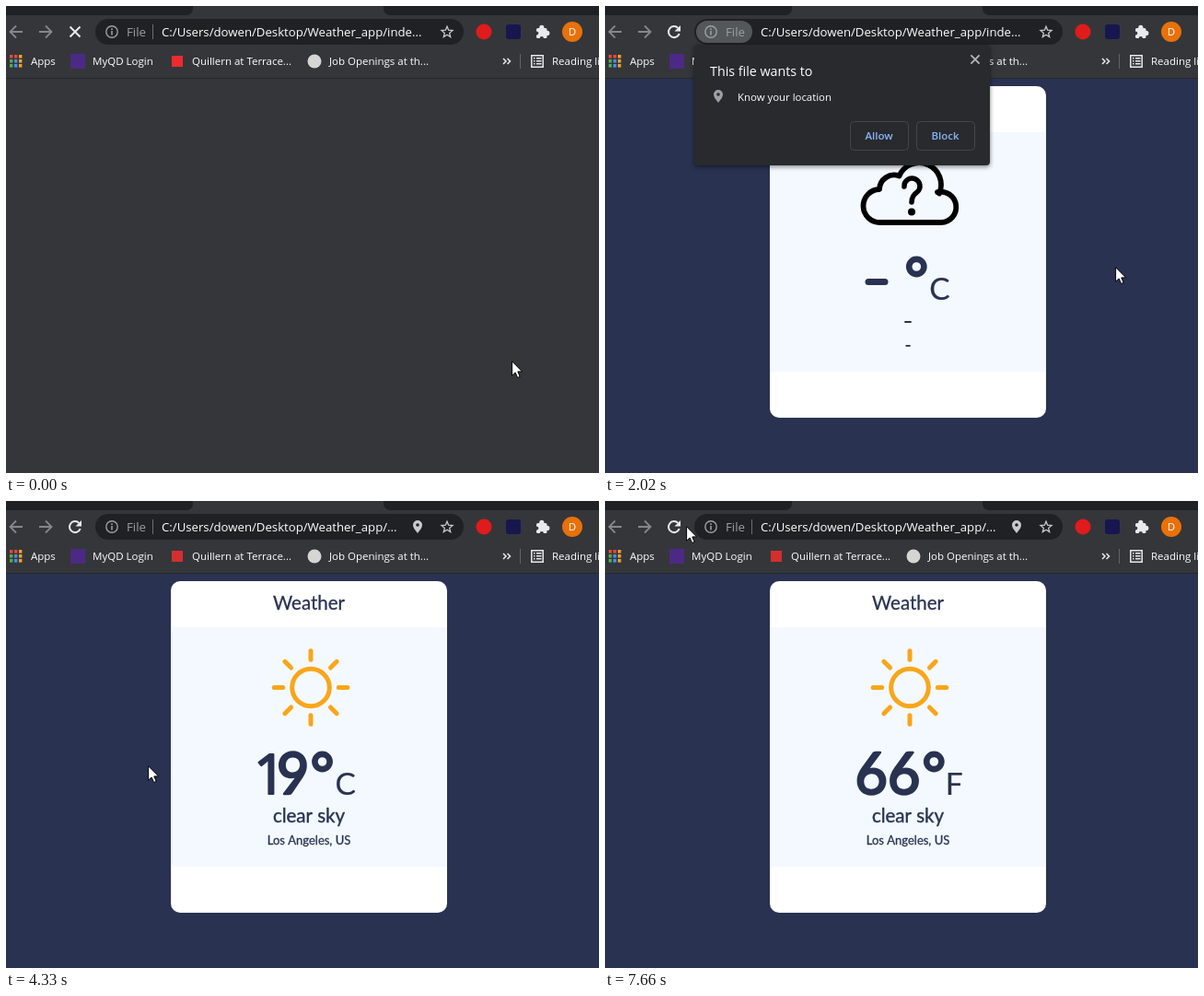
These frames come from a looping animation (644 px wide and 507 px high, 7.99 s). An HTML page with a canvas:

```html
<!DOCTYPE html>
<html lang="en">
<head>
<meta charset="utf-8">
<title>Weather app</title>
<style>
html, body { margin: 0; width: 100%; height: 100%; overflow: hidden; background: #35363a; }
canvas { display: block; }
</style>
</head>
<body>
<canvas id="stage" width="644" height="507"></canvas>
<script>
const ctx = document.getElementById('stage').getContext('2d');
const LOOP = 7990;
const UI = '"Open Sans", sans-serif';
const CARD = 'Lato, sans-serif';
const NAVY = '#293251', BAR = '#35363a', DARK = '#202124', GREY = '#9aa0a6', LIGHT = '#e8eaed', WHITE = '#fff';

// Pointer stops: [start ms, left, top, shape]
const STOPS = [
  [0, 549, 385], [340, 548, 385], [670, 551, 385], [1020, 580, 340], [1350, 587, 303],
  [2020, 554, 283], [2350, 379, 282, 'hand'], [2680, 302, 152], [3010, 298, 143],
  [3670, 181, 212], [4000, 154, 287], [4990, 225, 294, 'hand'], [5320, 328, 317, 'hand'],
  [5650, 360, 307, 'hand'], [6650, 181, 228], [6980, 94, 54], [7310, 185, 124], [7660, 88, 27]
];

function text(str, x, y, size, color, weight = 400, align = 'left') {
  ctx.font = `${weight} ${size}px ${UI}`;
  ctx.textAlign = align;
  ctx.fillStyle = color;
  ctx.fillText(str, x, y);
}

// Rounded lettering: a regular face thickened with a round outline
function soft(str, x, y, size, extra, align = 'left', family = CARD) {
  ctx.font = `400 ${size}px ${family}`;
  ctx.textAlign = align;
  ctx.fillStyle = ctx.strokeStyle = NAVY;
  ctx.fillText(str, x, y);
  ctx.lineWidth = extra;
  ctx.lineJoin = 'round';
  ctx.strokeText(str, x, y);
}

function box(x, y, w, h, r, color) {
  ctx.beginPath();
  ctx.roundRect(x, y, w, h, r);
  ctx.fillStyle = color;
  ctx.fill();
}

function disc(x, y, r, color) {
  ctx.beginPath();
  ctx.arc(x, y, r, 0, Math.PI * 2);
  ctx.fillStyle = color;
  ctx.fill();
}

function ring(x, y, r, width, color) {
  ctx.beginPath();
  ctx.arc(x, y, r, 0, Math.PI * 2);
  ctx.lineWidth = width;
  ctx.strokeStyle = color;
  ctx.stroke();
}

function line(d, width, color, cap = 'butt') {
  ctx.lineWidth = width;
  ctx.strokeStyle = color;
  ctx.lineCap = cap;
  ctx.lineJoin = cap === 'round' ? 'round' : 'miter';
  ctx.stroke(new Path2D(d));
}

function at(x, y, draw) {
  ctx.save();
  ctx.translate(x, y);
  draw();
  ctx.restore();
}

function pin(x, y, hole, color) {
  at(x, y, () => {
    ctx.fillStyle = color;
    ctx.fill(new Path2D('M0 7C-3 3-5 1-5-2A5 5 0 0 1 5-2C5 1 3 3 0 7Z'));
    disc(0, -2, 1.8, hole);
  });
}

function cross(x, y, r, width, color) {
  line(`M${x - r} ${y - r}L${x + r} ${y + r}M${x + r} ${y - r}L${x - r} ${y + r}`, width, color);
}

function star(x, y) {
  let d = '';
  for (let i = 0; i < 10; i++) {
    const a = i * Math.PI / 5 - Math.PI / 2, r = i % 2 ? 2.8 : 6.3;
    d += (i ? 'L' : 'M') + (x + r * Math.cos(a)) + ' ' + (y + 0.5 + r * Math.sin(a));
  }
  line(d + 'Z', 1.3, '#c8cacd');
}

function reload() {
  at(75, 28, () => {
    line('M4.3-4.1A6 6 0 1 0 5.7 2', 2, LIGHT);
    ctx.fillStyle = LIGHT;
    ctx.fill(new Path2D('M7-7V-.5H.5Z'));
  });
}

function fileChip(t) {
  if (t < 340 || t >= 4330) return false;
  const left = t < 670 ? 106 : 99;
  ctx.globalAlpha = t >= 4000 ? 0.5 : 1;
  box(left, 16, 160 - left, 24, 12, '#54575a');
  ctx.globalAlpha = 1;
  return true;
}

function toolbar(t) {
  box(0, 0, 644, 79, 0, BAR);
  box(0, 0, 203, 10, [0, 0, 7, 0], DARK);
  box(410, 0, 234, 10, [0, 0, 0, 7], DARK);
  box(0, 78, 644, 1, 0, '#27282b');

  line('M18 28H5M11 21.5L4.5 28L11 34.5', 1.8, '#85878b');
  line('M36 28H49M43 21.5L49.5 28L43 34.5', 1.8, '#85878b');
  if (t < 340) cross(75, 28, 5.5, 2, LIGHT);
  else reload();

  box(97, 14, 400, 28, 14, DARK);
  const chip = fileChip(t);
  ring(115, 28, 6.2, 1.4, GREY);
  box(114.2, 27, 1.6, 4.5, 0, GREY);
  box(114.2, 24.2, 1.6, 1.7, 0, GREY);
  text('File', 131, 33, 13.25, GREY);
  if (!chip) box(159, 20, 1, 16, 0, '#6b6e73');

  const allowed = t >= 3340;
  text('C:/Users/dowen/Desktop/Weather_app/' + (allowed ? '...' : 'inde...'), 169, 33, 13.2, WHITE);
  if (allowed) pin(447, 28, DARK, '#c8cacd');
  star(479, 28);

  disc(519, 28, 8.5, '#e01b1b');
  box(543, 20, 16, 16, 3, '#17164f');
  at(583, 28, () => {
    box(-7, -4, 11.5, 11, 1.5, LIGHT);
    disc(-1.2, -4.6, 2.6, LIGHT);
    disc(4.8, 1.4, 2.6, LIGHT);
    disc(-6.8, 1.6, 2.1, BAR);
    disc(-1.2, 7, 2.1, BAR);
  });
  disc(615, 28, 11, '#e8710a');
  text('D', 615, 32, 11.5, WHITE, 400, 'center');
}

function bookmarks(t) {
  const dots = ['#e5493a', '#e5493a', '#f0a030', '#4caf50', '#4a8df0', '#f0a030', '#4caf50', '#4a8df0', '#f0a030'];
  dots.forEach((c, i) => box(4 + i % 3 * 5, 53 + Math.floor(i / 3) * 5, 3.4, 3.6, 0, c));
  text('Apps', 27, 64, 11.5, WHITE);
  box(70, 52, 16, 16, 0, '#4b2a85');
  text('MyQD Login', 94, 64, 11.5, WHITE);
  box(180, 54, 12, 12, 0, t < 340 ? '#ee2a2e' : '#d32f2f');
  text('Quillern at Terrace...', 202, 64, 11.5, WHITE);
  disc(335, 60, 7.5, '#d5d5d3');
  text('Job Openings at th...', 351, 64, 11.5, WHITE);
  line('M540 57L543 60L540 63M544.5 57L547.5 60L544.5 63', 1.5, LIGHT);
  box(558, 52, 1, 16, 0, '#606367');
  line('M570.8 53.8H583.2V66.2H570.8Z', 1.5, LIGHT);
  for (let y = 56; y < 65; y += 3) {
    box(573, y, 1.5, 1.5, 0, LIGHT);
    box(576, y, 5.5, 1.5, 0, LIGHT);
  }
  text('Reading list', 593, 64, 11.5, WHITE);
}

function cloud() {
  line('M299 235A18 18 0 0 1 298 199A16 16 0 0 1 319.5 184.5A23.7 23.7 0 0 1 363 203.5' +
    'M361 202A16.7 16.7 0 1 1 365 235H299', 5.8, '#000', 'round');
  line('M325 196A8.5 8.5 0 1 1 339 202Q333 206 333 213', 5.5, '#000', 'round');
  disc(333, 223.5, 4, '#000');
}

function sun() {
  const gold = '#f9a61a';
  ring(331, 202.5, 20.3, 5, gold);
  for (let i = 0; i < 8; i++) at(331, 202.5, () => {
    ctx.rotate(i * Math.PI / 4);
    line('M30.3 0H39.8', 5, gold, 'round');
  });
}

function degree(x) {
  ring(x, 283, 8.1, 6.6, NAVY);
}

function page(t) {
  box(0, 79, 644, 428, 0, NAVY);
  box(179, 87, 300, 360, 10, WHITE);
  box(179, 137, 300, 260, 0, '#f4f9ff');
  soft('Weather', 329, 118, 20.5, 0.3, 'center');
  if (t < 4330) {
    cloud();
    box(282.5, 296, 25, 7, 3.5, NAVY);
    degree(338.3);
    soft('C', 352.3, 318.7, 33.5, 0.2);
    box(325.3, 342, 7.4, 2, 0, NAVY);
    box(326.5, 368, 5.2, 1.8, 0, NAVY);
    return;
  }
  sun();
  if (t < 6330) {
    soft('1', 269, 318, 61, 2.2, 'left', UI);
    soft('9', 294, 318, 61, 2.5);
    degree(343.5);
    soft('C', 357.5, 318.7, 33.5, 0.2);
  } else {
    soft('66', 271.5, 318, 61, 2.5);
    degree(357.3);
    soft('F', 369.8, 318.7, 33.5, 0.2);
  }
  soft('clear sky', 329, 349, 20.5, 0.4, 'center');
  soft('Los Angeles, US', 329, 373, 13, 0.3, 'center');
}

function button(label, x, hover) {
  if (hover) box(x, 125, 64, 32, 4, '#30373f');
  ctx.beginPath();
  ctx.roundRect(x + 0.5, 125.5, 63, 31, 4);
  ctx.lineWidth = 1;
  ctx.strokeStyle = '#43464a';
  ctx.stroke();
  text(label, x + 31.5, 145, 11.5, '#8ab4f8', 600, 'center');
}

function prompt(t) {
  if (t < 340 || t >= 3670) return;
  const fading = t < 670 || t >= 3340;
  ctx.save();
  if (fading) {
    ctx.globalAlpha = t < 670 ? 0.58 : 0.45;
    ctx.translate(257.5, 107.5);
    ctx.scale(0.982, 0.982);
    ctx.translate(-257.5, -107.5);
  }
  ctx.shadowColor = 'rgba(0,0,0,.5)';
  ctx.shadowBlur = 5;
  ctx.shadowOffsetY = 1.5;
  box(97, 42, 321, 131, 4, '#292a2d');
  ctx.shadowColor = 'transparent';
  text('This file wants to', 114, 76, 14.25, WHITE);
  cross(402, 58, 4.6, 1.8, '#b4b8bc');
  pin(123, 98, '#292a2d', GREY);
  text('Know your location', 144, 103, 11.4, WHITE);
  button('Allow', 266, t >= 3010);
  button('Block', 338, false);
  ctx.restore();
}

const ARROW = new Path2D('M.6.8V16.2L4.1 12.9L6.6 18.5L9.2 17.4L6.8 11.9H11.6Z');
const HAND = new Path2D('M6.5 14V2.6Q6.5.8 8 .8Q9.6.8 9.6 2.6V8.2Q11.6 7 12.4 9' +
  'Q14.4 8 15 10Q17.3 9.4 17.3 11.8V16Q17.3 18.5 15.4 20.5V23.2H7V21' +
  'Q4.6 18.7 3 15.5L1.2 12.7Q1.4 10.8 3.7 11.6Z');

function pointer(t) {
  const [, x, y, shape] = STOPS.filter(s => s[0] <= t).pop();
  at(x, y, () => {
    const path = shape ? HAND : ARROW;
    ctx.fillStyle = WHITE;
    ctx.fill(path);
    ctx.strokeStyle = '#000';
    ctx.lineWidth = 1;
    ctx.lineJoin = 'round';
    ctx.stroke(path);
    if (shape) line('M9.6 8.5V12.5M12.4 9.2V12.5M15 10.2V13', 1, '#000');
  });
}

function draw(now) {
  const t = now % LOOP;
  box(0, 0, 644, 507, 0, BAR);
  if (t >= 340) page(t);
  toolbar(t);
  bookmarks(t);
  prompt(t);
  pointer(t);
}

const start = performance.now();
function tick() {
  draw(performance.now() - start);
  requestAnimationFrame(tick);
}
tick();
</script>
</body>
</html>
```
